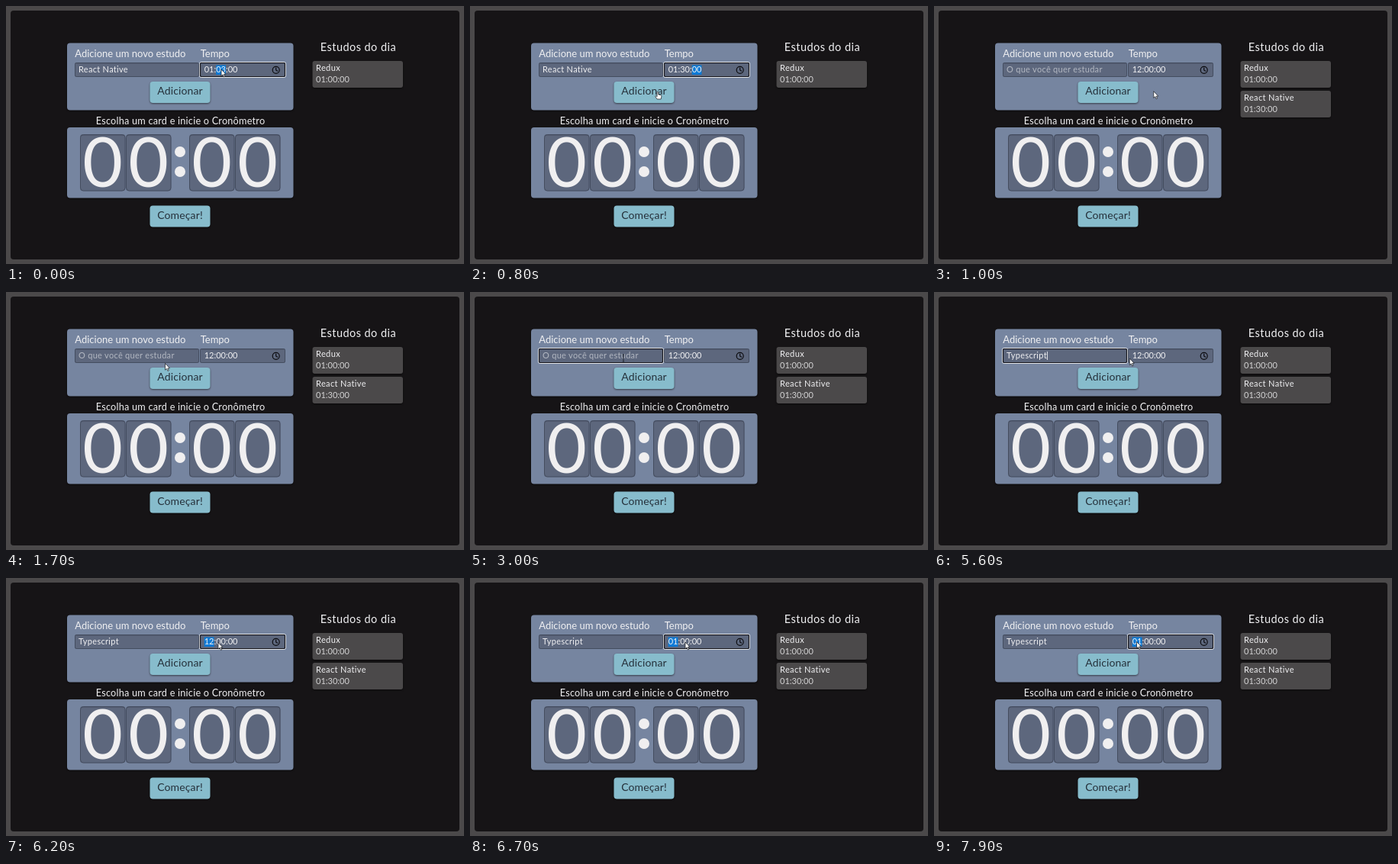
Write an HTML page that moves like this. It is 600x338 px and loops after 8 s.

```html
<!DOCTYPE html>
<html lang="pt">
<head>
<meta charset="utf-8">
<title>Cronômetro de estudos</title>
<style>
  html, body { margin: 0; width: 100%; height: 100%; overflow: hidden; background: #4b494a; }
  svg { display: block; width: 100vw; height: 100vh; }
  text { font-family: Lato, "Open Sans", sans-serif; fill: #f0f0f2; white-space: pre; }
  .label { font-size: 13px; }
  .field { font-size: 11px; letter-spacing: .3px; }
  .time { font-size: 11px; }
  .card { font-size: 11px; letter-spacing: .38px; }
  .dim { fill: #d3d2d3; }
  .title { font-size: 14.5px; letter-spacing: .45px; }
  .prompt { font-size: 12.7px; letter-spacing: .22px; }
  .btn { font-size: 14px; letter-spacing: .12px; fill: #25303a; text-anchor: middle; }
  .digit { font-size: 91px; text-anchor: middle; fill: #f0eff0; }
  .raised { filter: drop-shadow(0 1.5px 1px rgba(0, 0, 0, .55)); }
  .inset { fill: none; stroke: #3c4456; stroke-opacity: .75; }
</style>
</head>
<body>
<svg id="stage" viewBox="0 0 600 338" preserveAspectRatio="none">
  <rect width="600" height="338" fill="#4b494a"/>
  <rect x="6" y="6" width="588" height="326" rx="4" fill="#161416"/>
  <g id="layout"></g>
  <g id="second"></g>
  <g id="inputs">
    <rect id="sel" y="77.5" height="12.5" fill="#0b7ad6"/>
    <text id="study" class="field" x="95" y="86.5"></text>
    <text id="clock" class="time" x="259.7" y="86.5"></text>
    <rect id="caret" y="78" width="1" height="11" fill="#e6e7ec"/>
    <g fill="none" stroke="#0c0c10" stroke-width="1.2" stroke-linecap="round">
      <circle cx="353.7" cy="83.8" r="4.5"/>
      <path d="M353.7 81v3l2 1.2"/>
    </g>
    <g id="ring" fill="none">
      <rect id="ringOut" y="73.5" height="20" rx="2" stroke="#e4e6ea"/>
      <rect id="ringIn" y="74.5" height="18" rx="1.5" stroke="#14141a" stroke-width="1.2"/>
    </g>
  </g>
  <g id="pointer">
    <path id="arrow" d="M0 0V8.6L2 6.9 3.4 10 4.8 9.4 3.4 6.4H6Z" fill="#fff" stroke="#15161a" stroke-width=".7"/>
    <path id="hand" d="M-.9 .6Q0-.6.9.6V4L4 4.7Q5 5 4.9 6.2L4.2 10H-1L-3.2 6.6Q-3.3 5.4-2 5.8L-.9 6.7Z" fill="#fff" stroke="#15161a" stroke-width=".7"/>
    <path id="beam" d="M-1.2 0H1.2M0 0V9M-1.2 9H1.2" fill="none" stroke="#20242e" stroke-width=".9"/>
  </g>
</svg>
<script>
const LOOP = 8000, STEP = 100;
const $ = id => document.getElementById(id);
const ns = "http://www.w3.org/2000/svg";

function add(parent, tag, attrs, content) {
  const el = document.createElementNS(ns, tag);
  for (const key in attrs) el.setAttribute(key, attrs[key]);
  if (content) el.textContent = content;
  parent.appendChild(el);
  return el;
}
function set(el, attrs) {
  for (const key in attrs) el.setAttribute(key, attrs[key]);
}
const show = (el, on) => set(el, { visibility: on ? "inherit" : "hidden" });

const layout = $("layout");
const box = (parent, x, y, width, height, fill, rx = 4) =>
  add(parent, "rect", { x, y, width, height, rx, fill, class: "raised" });
const label = (parent, x, y, cls, content) =>
  add(parent, "text", { x, y, class: cls }, content);

function well(x, y, width, height, rx) {
  add(layout, "rect", { x, y, width, height, rx, fill: "#5d677d" });
  add(layout, "rect", { x: x + .5, y: y + .5, width: width - 1, height: height - 1, rx, class: "inset" });
  add(layout, "path", { d: `M${x + 2} ${y + 1.6}H${x + width - 2}`, stroke: "#3c4456", "stroke-opacity": .35 });
}
function button(y, content) {
  box(layout, 188.5, y, 79, 28, "#87bccc");
  label(layout, 228, y + 17, "btn", content);
}
function card(parent, y, name, time) {
  box(parent, 401.5, y, 118.5, 35, "#4b494a", 3);
  label(parent, 406, y + 12.7, "card", name);
  label(parent, 406, y + 27.5, "time dim", time);
}

box(layout, 80, 48.5, 296.5, 88, "#7685a0");
label(layout, 90.3, 66.7, "label", "Adicione um novo estudo");
label(layout, 254.7, 66.7, "label", "Tempo");
well(90, 74, 163, 19, 2);
well(254, 74, 112, 19, 2);
button(99, "Adicionar");

label(layout, 117.8, 154.8, "prompt", "Escolha um card e inicie o Cronômetro");
box(layout, 80, 159, 296.5, 92.5, "#7685a0");
for (const x of [97, 157, 240, 300]) {
  well(x, 168, 59.5, 74.5, 4);
  label(layout, x + 29.6, 237, "digit", "0");
}
for (const cy of [191, 217]) add(layout, "circle", { cx: 228, cy, r: 7, fill: "#f0eff0" });
button(261.5, "Começar!");

label(layout, 411.8, 58.7, "title", "Estudos do dia");
card(layout, 72, "Redux", "01:00:00");
card($("second"), 111, "React Native", "01:30:00");

// Pointer stops: time, x, y
const path = [
  [0, 282, 83], [400, 282, 83], [700, 246, 112], [900, 246, 112],
  [1200, 407, 111], [1700, 208.5, 93.5], [2100, 112, 82], [2400, 201, 82],
  [5000, 201, 82], [5600, 256.3, 87], [5900, 256.3, 87], [6300, 282, 84],
  [6800, 282, 84], [7600, 270, 86], [7900, 265.5, 83.5], [8000, 265.5, 83.5]
];
function pointerAt(t) {
  let i = 1;
  while (i < path.length - 1 && t > path[i][0]) i++;
  const [t0, x0, y0] = path[i - 1], [t1, x1, y1] = path[i];
  const k = Math.min(1, (t - t0) / (t1 - t0));
  const e = k * k * (3 - 2 * k);
  return [x0 + (x1 - x0) * e, y0 + (y1 - y0) * e];
}

const within = (x, y, l, t, r, b) => x >= l && x <= r && y >= t && y <= b;

function drawPointer(t) {
  const [x, y] = pointerAt(t);
  const hand = within(x, y, 188, 99, 268, 127) || within(x, y, 401, 72, 520, 146);
  const beam = within(x, y, 90, 74, 252, 92.5);
  set($("pointer"), { transform: `translate(${x} ${y})` });
  show($("hand"), hand);
  show($("beam"), beam);
  show($("arrow"), !hand && !beam);
}

function studyText(t) {
  if (t < 1000) return "React Native";
  if (t < 3600) return "";
  return "Typescript".slice(0, t < 3800 ? 1 : 2 + Math.round((t - 3800) / 87.5));
}
function clockText(t) {
  if (t < 400) return "01:03:00";
  if (t < 1000) return "01:30:00";
  return t < 6400 ? "12:00:00" : "01:00:00";
}
function focusAt(t) {
  if (t < 1000 || t >= 5900) return "clock";
  return t >= 2200 ? "study" : "";
}
function caretOn(t) {
  if (t >= 3600) return t < 5100 || t >= 5600;
  return (t - 2200) % 1000 < 500;
}

function draw(t) {
  const typed = studyText(t), focus = focusAt(t);
  const study = $("study"), clock = $("clock");
  study.textContent = typed || "O que você quer estudar";
  study.style.fill = typed ? "#f0f0f2" : "#b3b8c2";
  clock.textContent = clockText(t);
  show($("second"), t >= 1000);

  show($("ring"), focus);
  const [left, width] = focus === "clock" ? [253.5, 113] : [89.5, 164];
  set($("ringOut"), { x: left, width });
  set($("ringIn"), { x: left + 1, width: width - 2 });

  show($("sel"), focus === "clock");
  const first = t < 400 ? 3 : t < 1000 ? 6 : 0;
  const x0 = clock.getStartPositionOfChar(first).x;
  const x1 = clock.getEndPositionOfChar(first + 1).x;
  set($("sel"), { x: x0, width: x1 - x0 });

  show($("caret"), focus === "study" && caretOn(t));
  set($("caret"), { x: 95 + (typed ? study.getComputedTextLength() : -.5) });
  drawPointer(t);
}

const start = performance.now();
function frame() {
  const t = (performance.now() - start) % LOOP;
  draw(Math.floor(t / STEP) * STEP);
  requestAnimationFrame(frame);
}
frame();
</script>
</body>
</html>
```
